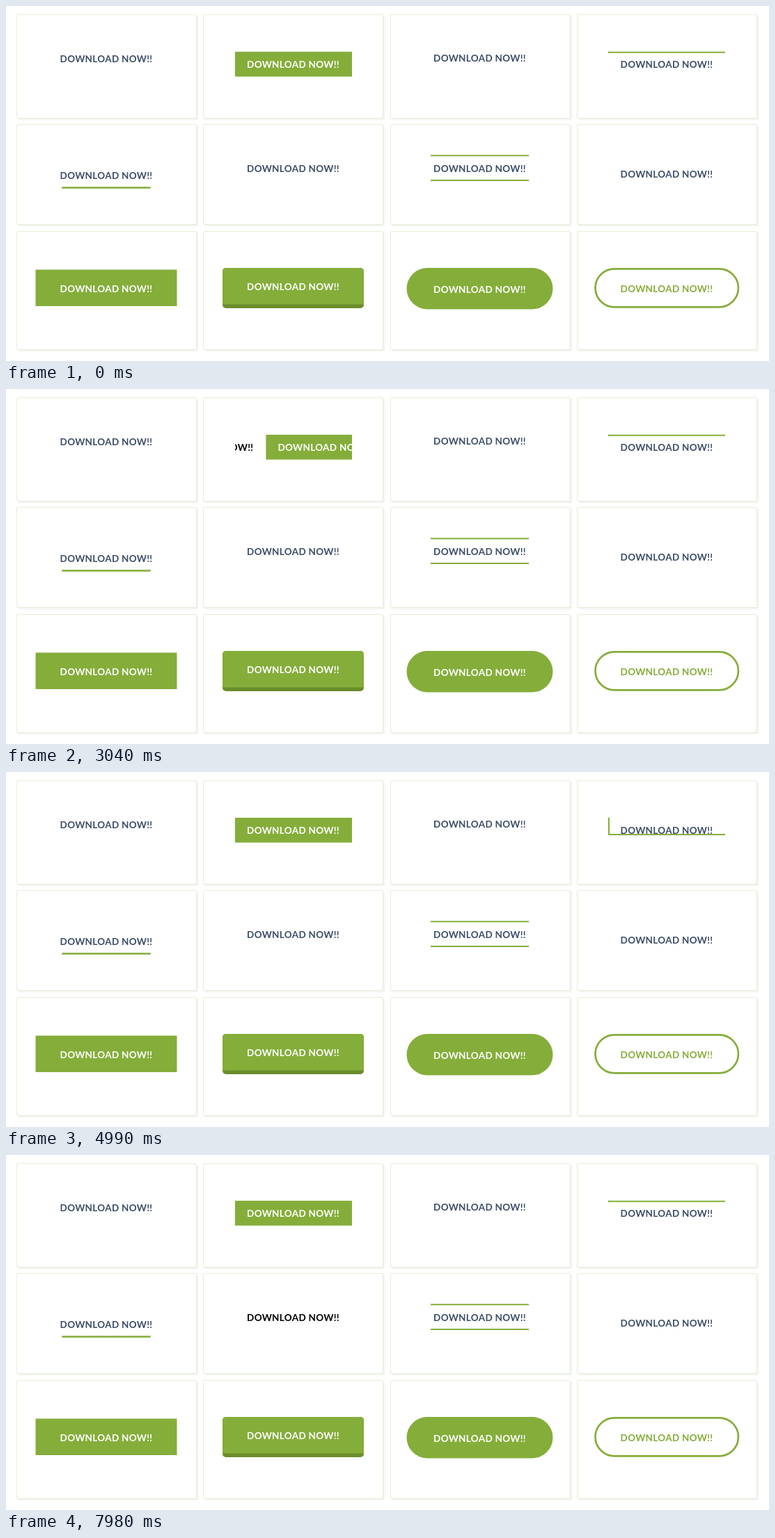
These frames come from a looping animation (1096x511 px, 8 s). An HTML page:

```html
<!DOCTYPE html>
<html lang="en">
<head>
<meta charset="utf-8">
<title>Button hover effects</title>
<style>
  html, body { margin: 0; width: 100%; height: 100%; overflow: hidden; background: #fff; }
  .card {
    position: absolute; box-sizing: border-box;
    border: 1px solid #e6eed5; border-radius: 2px;
    box-shadow: 2px 2px 2px #eff4ef; background: #fff;
  }
  svg { position: absolute; left: 0; top: 0; }
  text {
    font: 700 13.5px Lato, "Open Sans", sans-serif;
    letter-spacing: .3px; text-anchor: middle; fill: #3c4d68;
  }
  .green { fill: #85ad3a; }
  .white { fill: #fff; }
  .black { fill: #000; }
  .semi { font-size: 13px; font-weight: 600; letter-spacing: .6px; }
</style>
</head>
<body>
<svg id="stage" width="1096" height="511" viewBox="0 0 1096 511">
  <clipPath id="pushClip"><rect x="329" y="65.6" width="168" height="36.2"/></clipPath>
  <clipPath id="rollClip"><rect x="606" y="66" width="150" height="16"/></clipPath>

  <!-- row 1: brackets, push, roll, sliding frame -->
  <text class="label" x="144" y="81"></text>
  <text class="green" id="bracketL" x="63.5" y="80">[</text>
  <text class="green" id="bracketR" x="224.5" y="80">]</text>

  <g clip-path="url(#pushClip)">
    <g id="push">
      <rect class="green" x="329" y="65.6" width="168" height="36.2"/>
      <text class="label white" x="412.5" y="89"></text>
      <text class="label black" x="244.5" y="89"></text>
    </g>
  </g>

  <g clip-path="url(#rollClip)">
    <g id="roll">
      <text class="label" x="680.5" y="80"></text>
      <text class="label semi" x="680.5" y="99"></text>
    </g>
  </g>

  <rect class="green" id="slideLine" x="865" y="65.7" width="168" height="2"/>
  <rect class="green" id="sideLine" x="865" y="65.7" width="2" height="2"/>
  <text class="label" x="949" y="89"></text>

  <!-- row 2: twin borders, colour change, still ones -->
  <text class="label" x="144" y="248.5"></text>
  <rect class="green" id="lowBorder" x="-75" y="-1.5" width="150" height="3"/>
  <rect class="green" id="highBorder" x="-75" y="-1.5" width="150" height="3"/>
  <text class="label" id="darkening" x="412.5" y="239"></text>
  <rect class="green" x="610" y="214.3" width="141" height="2"/>
  <rect class="green" x="610" y="250" width="141" height="2"/>
  <text class="label" x="680.5" y="239"></text>
  <text class="label" x="949" y="247"></text>

  <!-- row 3: solid buttons -->
  <rect class="green" x="42.5" y="379.5" width="203" height="52.5"/>
  <text class="label white" x="144" y="412"></text>
  <rect x="311" y="377" width="203" height="58" rx="5" fill="#6a8c2b"/>
  <path class="green" d="M311 429.5V382a5 5 0 0 1 5-5H509a5 5 0 0 1 5 5V429.5z"/>
  <text class="label white" x="412.5" y="409"></text>
  <rect class="green" x="575.5" y="377" width="210" height="59.5" rx="29.75"/>
  <text class="label white" x="680.5" y="413"></text>
  <rect x="846.5" y="378.3" width="205.5" height="55" rx="27.5" fill="none" stroke="#85ad3a" stroke-width="2.7"/>
  <text class="label green" x="949" y="412"></text>
</svg>
<script>
  const LOOP = 8000;
  const $ = id => document.getElementById(id);
  const set = (id, attrs) => {
    for (const name in attrs) $(id).setAttribute(name, attrs[name]);
  };

  for (const [top, height] of [[12, 150], [170, 145], [324, 171]]) {
    for (let col = 0; col < 4; col++) {
      const card = document.createElement("div");
      card.className = "card";
      card.style.cssText =
        `left:${Math.round(15 + col * 268.3)}px;top:${top}px;width:259px;height:${height}px`;
      document.body.insertBefore(card, $("stage"));
    }
  }
  document.querySelectorAll(".label").forEach(el => el.textContent = "DOWNLOAD NOW!!");

  // The CSS "ease" curve: cubic-bezier(.25, .1, .25, 1)
  function ease(p) {
    if (p <= 0) return 0;
    if (p >= 1) return 1;
    const bezier = (a, b, s) => 3 * a * s * (1 - s) ** 2 + 3 * b * s * s * (1 - s) + s ** 3;
    let low = 0, high = 1;
    for (let i = 0; i < 24; i++) {
      const mid = (low + high) / 2;
      if (bezier(.25, .25, mid) < p) low = mid; else high = mid;
    }
    return bezier(.1, 1, low);
  }

  // 0 at rest, 1 while hovered
  const hover = (t, enter, leave, duration = 300) =>
    t < leave ? ease((t - enter) / duration) : 1 - ease((t - leave) / duration);

  function draw(t) {
    const shift = 20 * (1 - hover(t, 665, 1370));
    const opacity = hover(t, 665, 1370, 200);
    set("bracketL", { transform: `translate(${shift})`, opacity });
    set("bracketR", { transform: `translate(${-shift})`, opacity });

    set("push", { transform: `translate(${168 * hover(t, 2015, 2865, 400)})` });
    set("roll", { transform: `translate(0 ${-19 * hover(t, 3570, 4270)})` });

    const drop = 34 * hover(t, 4870, 5545);
    set("slideLine", { y: 65.7 + drop });
    set("sideLine", { height: Math.max(2, drop) });

    const grow = hover(t, 6210, 7080);
    const scale = `scale(${.85 + .15 * grow})`;
    set("lowBorder", { transform: `translate(144 261.5) ${scale}` });
    set("highBorder", { transform: `translate(144 ${261.5 - 36 * grow}) ${scale}`, opacity: grow });

    $("darkening").classList.toggle("black", t >= 7980);
  }

  const start = performance.now();
  function tick() {
    draw((performance.now() - start) % LOOP);
    requestAnimationFrame(tick);
  }
  tick();
</script>
</body>
</html>
```
